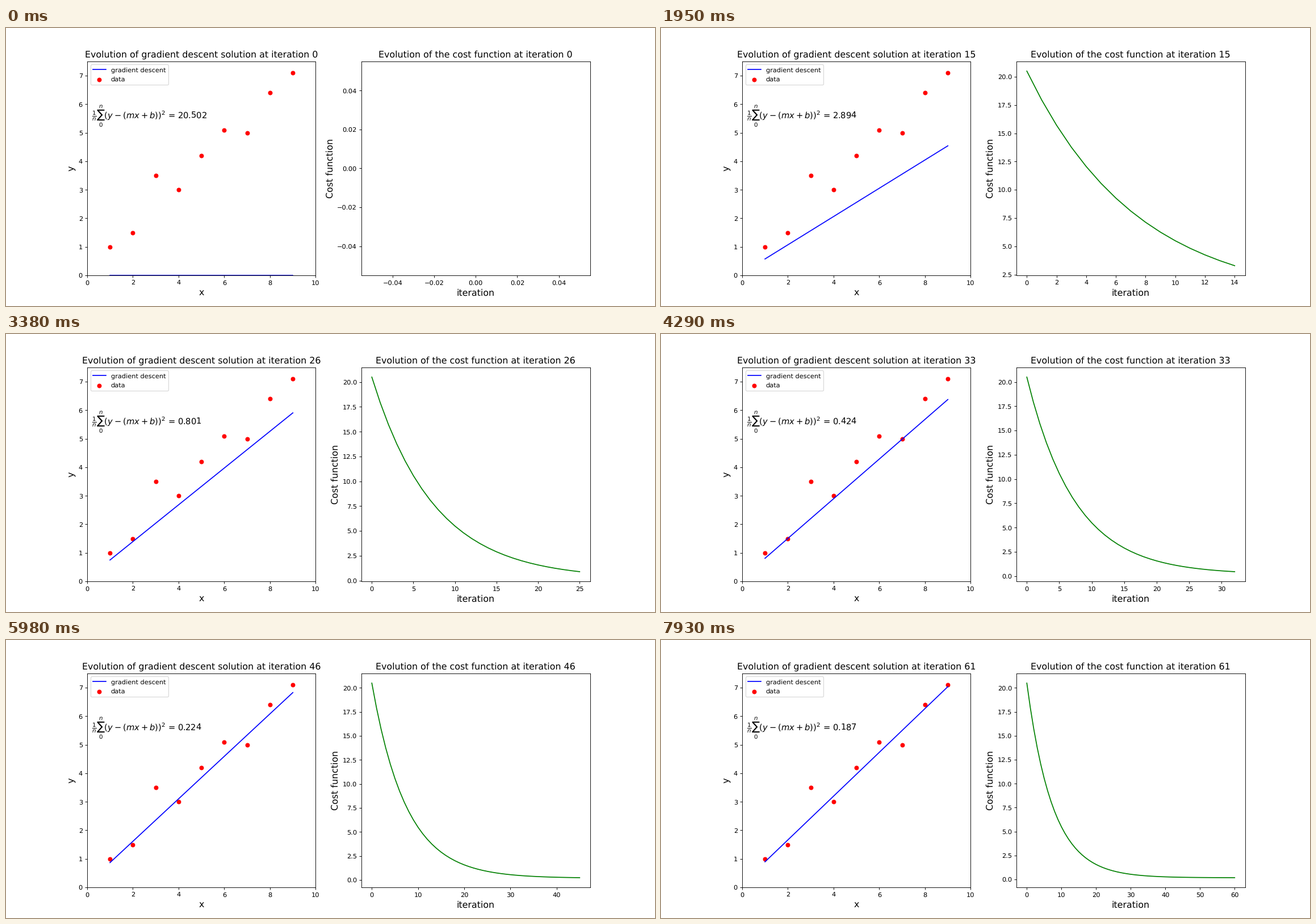
A matplotlib script for the animation above (8000 ms loop, 1143 by 490 pixels).

```python
import numpy as np
import matplotlib.pyplot as plt
from matplotlib.animation import FuncAnimation

WIDTH, HEIGHT = 1143, 490
DPI = WIDTH / 14
LOOP_MS, TICK_MS, STEP_MS = 8000, 50, 130
STEPS = LOOP_MS // STEP_MS + 1
RATE = 0.001

# Unhinted glyphs keep their true height at this small size.
plt.rcParams["text.hinting"] = "none"

x = np.arange(1, 10)
y = np.array([1, 1.5, 3.5, 3, 4.2, 5.1, 5, 6.4, 7.1])


def descend(steps):
    """Slope, intercept and mean squared error before each update."""
    m = b = 0.0
    history = []
    for _ in range(steps):
        error = y - (m * x + b)
        history.append((m, b, np.mean(error ** 2)))
        m += RATE * 2 * np.mean(x * error)
        b += RATE * 2 * np.mean(error)
    return np.array(history).T


slopes, intercepts, costs = descend(STEPS)

fig, (fit_ax, cost_ax) = plt.subplots(
    1, 2, figsize=(WIDTH / DPI, HEIGHT / DPI), dpi=DPI)
# Just under 0.9, so the left frame's right edge snaps down to its pixel.
fig.subplots_adjust(right=0.8999)

fit_line, = fit_ax.plot(x, 0 * x, color="blue", label="gradient descent")
fit_ax.scatter(x, y, color="red", label="data")
fit_ax.set_xlim(0, 10)
fit_ax.set_ylim(0, 7.5)
fit_ax.set_xlabel("x", fontsize=14)
fit_ax.set_ylabel("y", fontsize=14)
fit_ax.legend(loc="upper left")
formula = fit_ax.text(0.2, 5.5, "", fontsize=13)

cost_line, = cost_ax.plot([], [], color="green")
cost_ax.set_xlabel("iteration", fontsize=14)
cost_ax.set_ylabel("Cost function", fontsize=14)


def update(frame):
    # Each step begins on the tick that contains its start time.
    i = min((frame * TICK_MS + TICK_MS - 1) // STEP_MS, STEPS - 1)

    fit_line.set_ydata(slopes[i] * x + intercepts[i])
    formula.set_text(
        rf"$\frac{{1}}{{n}}\sum_0^n (y-(mx+b))^2$ = {costs[i]:.3f}")
    fit_ax.set_title(
        f"Evolution of gradient descent solution at iteration {i}", fontsize=14)

    cost_line.set_data(np.arange(i), costs[:i])
    cost_ax.relim()
    cost_ax.autoscale_view()
    cost_ax.set_title(
        f"Evolution of the cost function at iteration {i}", fontsize=14)
    return fit_line, formula, cost_line


anim = FuncAnimation(fig, update, frames=LOOP_MS // TICK_MS,
                     interval=TICK_MS, repeat=True, repeat_delay=0)
plt.show()
```
